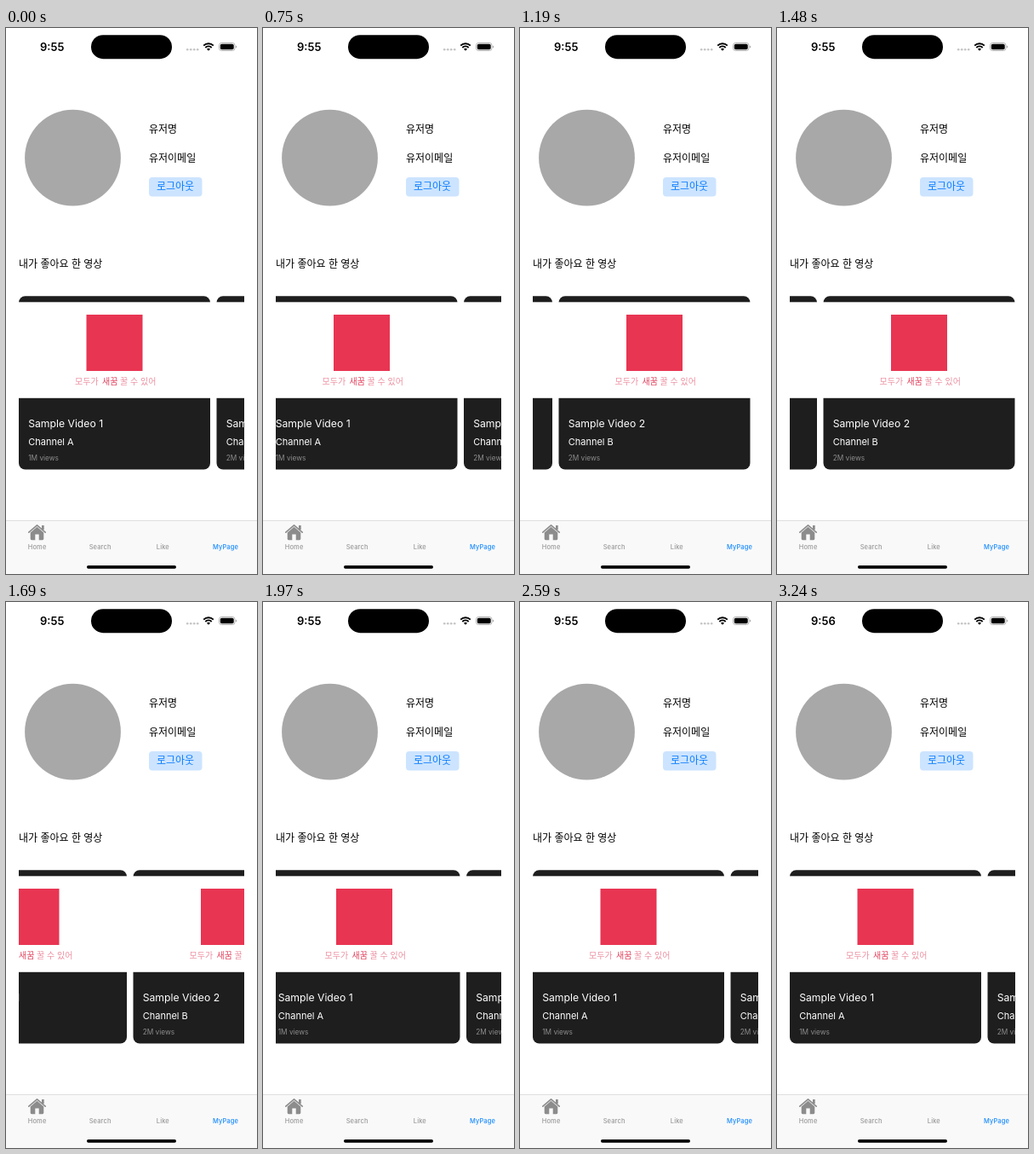
Recreate the animation shown at these times as an HTML page. Size 295 by 640 pixels, loop 3340 ms.

```html
<!DOCTYPE html>
<html lang="ko">
<head>
<meta charset="utf-8">
<style>
html, body { margin: 0; width: 100%; height: 100%; overflow: hidden; background: #fff; }
svg { display: block; width: 295px; height: 640px; font-family: Inter, sans-serif; }
.ko { font-family: "Noto Sans CJK KR", "Noto Sans CJK", sans-serif; font-size: 12px; }
.title { font-size: 12.2px; fill: #fff; }
.channel { font-size: 11px; fill: #fff; }
.views { font-size: 8.3px; fill: #8c8c8c; }
.slogan { font-size: 10px; font-weight: 300; fill: #ec8fa0; }
.slogan .strong { font-weight: 500; fill: #e0405c; }
.tabs { font-size: 7.5px; font-weight: 500; letter-spacing: .12px; fill: #999; text-anchor: middle; }
</style>
</head>
<body>
<svg viewBox="0 0 295 640">
  <defs>
    <clipPath id="view"><rect x="15" y="310" width="265" height="212"/></clipPath>
  </defs>
  <rect width="295" height="640" fill="#fff"/>

  <text id="clock" x="40" y="26.6" font-size="13" font-weight="600">9:55</text>
  <rect x="100" y="8.2" width="95" height="28" rx="14"/>
  <g fill="#c4c4c4">
    <circle cx="213.2" cy="25.3" r="1.3"/><circle cx="217.2" cy="25.3" r="1.3"/>
    <circle cx="221.2" cy="25.3" r="1.3"/><circle cx="225.2" cy="25.3" r="1.3"/>
  </g>
  <g fill="none" stroke="#000" stroke-width="1.9">
    <path d="M232.2 20.6a8.3 8.3 0 0 1 11.6 0"/>
    <path d="M234.3 23a5.3 5.3 0 0 1 7.4 0"/>
  </g>
  <path d="M238 26.8l-2-2.1a2.9 2.9 0 0 1 4 0z"/>
  <rect x="250.5" y="17.5" width="18.5" height="9" rx="2.8" fill="none" stroke="#aaa" stroke-width=".9"/>
  <rect x="251.8" y="18.8" width="15.9" height="6.4" rx="1.7"/>
  <path d="M270 20.4q1.3.5 1.3 1.6t-1.3 1.6z" fill="#aaa"/>

  <circle cx="78.5" cy="152.2" r="56.4" fill="#a8a8a8"/>
  <g class="ko">
    <text x="168" y="123">유저명</text>
    <text x="168" y="157">유저이메일</text>
    <rect x="168" y="175" width="62.5" height="22.5" rx="4" fill="#cce4ff"/>
    <text x="177" y="190.4" fill="#0a7cff">로그아웃</text>
    <text x="15" y="280.6">내가 좋아요 한 영상</text>
  </g>

  <g clip-path="url(#view)"><g id="cards"></g></g>

  <rect y="577" width="295" height="63" fill="#f9f9f9"/>
  <rect y="577" width="295" height=".6" fill="#cfcfcf"/>
  <g fill="#8c8c8c">
    <path d="M36.5 584.8l7.8 6.8v7.2q0 1.4-1.4 1.4h-4.2v-6.6h-4.4v6.6h-4.2q-1.4 0-1.4-1.4v-7.2z"/>
    <path d="M42 583h2.7v5h-2.7z"/>
    <path d="M26.8 591.2l9.7-8.4 9.7 8.4" fill="none" stroke="#8c8c8c" stroke-width="1.6" stroke-linecap="round" stroke-linejoin="round"/>
  </g>
  <g class="tabs">
    <text x="36.6" y="611.3">Home</text>
    <text x="110.6" y="611.3">Search</text>
    <text x="184.3" y="611.3">Like</text>
    <text x="258" y="611.3" fill="#1a8cff">MyPage</text>
  </g>
  <rect x="95" y="630" width="105" height="3.7" rx="1.85"/>
</svg>
<script>
const LOOP = 3340, CLOCK_TICK = 3240;
const clock = document.getElementById('clock');
const cards = document.getElementById('cards');

const card = (x, n, channel) => `
  <g transform="translate(${x} 314)">
    <rect y=".2" width="225" height="203.2" rx="7.5" fill="#1e1e1e"/>
    <rect x="-1" y="7.3" width="227" height="112.5" fill="#fff"/>
    <rect x="79.5" y="22" width="66" height="66" fill="#e83552"/>
    <g class="ko slogan">
      <text x="66" y="104">모두가</text>
      <text class="strong" x="98" y="104">새꿈</text>
      <text x="119" y="104">꿀 수 있어</text>
    </g>
    <text class="title" x="11.2" y="154.4">Sample Video ${n}</text>
    <text class="channel" x="11.2" y="175">Channel ${channel}</text>
    <text class="views" x="11.2" y="193">${n}M views</text>
  </g>`;
cards.innerHTML = card(15, 1, 'A') + card(247.5, 2, 'B');

// The screen refreshes at these times while the list scrolls.
const ticks = [750, 820, 890, 960, 1030, 1100, 1190, 1260, 1330, 1400, 1470, 1540, 1620,
  1690, 1760, 1830, 1900, 1970, 2060, 2130, 2200, 2270, 2340, 2410, 2500, 2590];

// Scroll offset: flick to the end, bounce, flick back, bounce.
const path = [[680, 0], [750, 11.5], [890, 95], [1030, 162], [1190, 202], [1330, 197.5],
  [1470, 193], [1540, 187], [1690, 98], [1830, 40], [1970, 8.5], [2090, -6],
  [2270, -2.5], [2590, 0]];

function slope(i) {
  const a = path[Math.max(i - 1, 0)], b = path[Math.min(i + 1, path.length - 1)];
  return (b[1] - a[1]) / (b[0] - a[0]);
}

function offsetAt(t) {
  const i = path.findIndex(p => p[0] > t) - 1;
  if (i < 0) return 0;
  const [t0, a] = path[i], [t1, b] = path[i + 1];
  const d = t1 - t0, u = (t - t0) / d, v = 1 - u;
  return v * v * (1 + 2 * u) * a + u * u * (3 - 2 * u) * b
    + d * u * v * (v * slope(i) - u * slope(i + 1));
}

function draw(t) {
  const tick = ticks.filter(k => k <= t).pop();
  const x = tick ? offsetAt(tick) : 0;
  cards.setAttribute('transform', `translate(${-x.toFixed(2)} 0)`);
  clock.textContent = t < CLOCK_TICK ? '9:55' : '9:56';
}

const start = performance.now();
function loop() {
  draw((performance.now() - start) % LOOP);
  requestAnimationFrame(loop);
}
loop();
</script>
</body>
</html>
```
